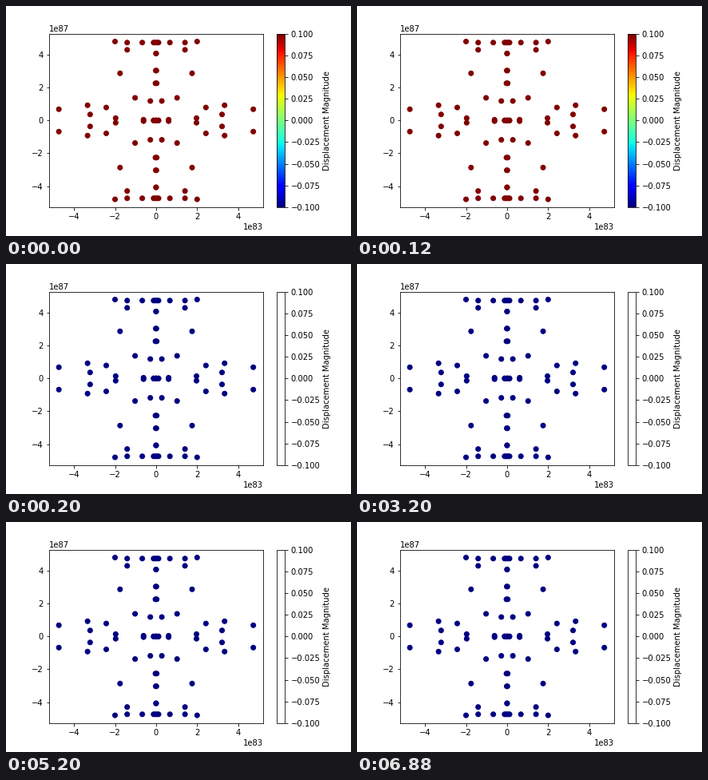
Animation of 432 by 288 pixels, one loop 8 s. Source, as a matplotlib script:

```python
import numpy as np
import matplotlib.pyplot as plt
from matplotlib.animation import FuncAnimation

STEP, FRAMES = 200, 40
UNIT = np.array([1e83, 1e87])
SCALE = np.array([25.68, 20.58])     # pixels per axis unit
HALF = np.array([133.92, 108.72])    # half the plot area in pixels

plt.rcParams.update({
    "font.family": "DejaVu Sans",
    "font.size": 10,
    "figure.subplot.bottom": 0.125,
})


def quadrant():
    """Dots of one quarter of the mesh, in pixels from the centre."""
    top = [(x, 97.5) for x in (1, 3.1, 17.3, 36.2)]
    middle = [(x, x / 17.5) for x in (0, 3, 15.7, 50.6)]
    column = [(0.4 * k, 83.8 * 0.745 ** k) for k in range(3)]
    wings = [(51.4, 98.8), (36.2, 88.4), (45.1, 59), (26.3, 28.3), (7.2, 24.3),
             (62.4, 16.2), (85.8, 19), (82.6, 7.5), (121.75, 14)]
    return np.array(top + middle + column + wings)


def mirrored(points):
    flips = [(1, 1), (-1, 1), (1, -1), (-1, -1)]
    return np.concatenate([points * flip for flip in flips])


fig, ax = plt.subplots(figsize=(6, 4), dpi=72)
pos = mirrored(quadrant()) / SCALE * UNIT
dots = ax.scatter(*pos.T, c=np.zeros(len(pos)),
                  cmap="jet", vmin=-0.1, vmax=0.1)
bar = fig.colorbar(dots, ax=ax, label="Displacement Magnitude")

x_lim, y_lim = HALF / SCALE * UNIT
ax.set_xlim(-x_lim, x_lim)
ax.set_ylim(-y_lim, y_lim)


def update(i):
    start = i == 0
    dots.set_array(np.full(len(pos), 0.1 if start else -0.1))
    bar.solids.set_visible(start)
    return dots, bar.solids


anim = FuncAnimation(fig, update, frames=FRAMES, interval=STEP,
                     repeat=True, repeat_delay=0, blit=False)
plt.show()
```
